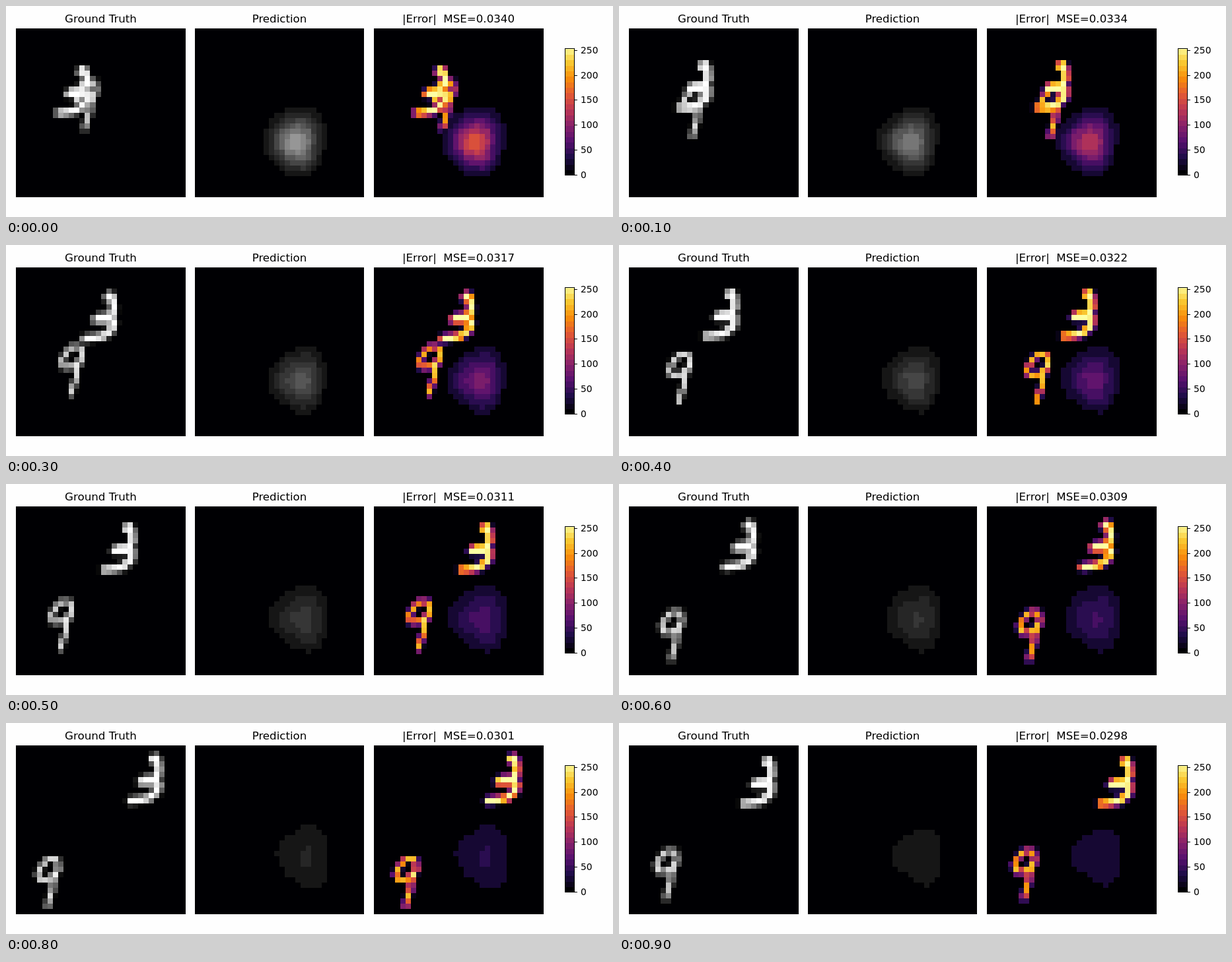
An HTML page with a canvas for the animation above (1 s loop, 919 by 320 pixels).

```html
<!DOCTYPE html>
<html lang="en">
<head>
<meta charset="utf-8">
<title>Prediction error</title>
<style>
  html, body { margin: 0; width: 100%; height: 100%; overflow: hidden; background: #fefefe; }
  canvas, svg { position: absolute; left: 0; top: 0; width: 919px; height: 320px; }
  text { font-family: "DejaVu Sans", sans-serif; font-size: 13.89px; fill: #000; white-space: pre; }
  .title { font-size: 16.67px; text-anchor: middle; }
</style>
</head>
<body>
<canvas id="stage" width="919" height="320"></canvas>
<svg viewBox="0 0 919 320">
  <text class="title" x="143.5" y="25">Ground Truth</text>
  <text class="title" x="414" y="25">Prediction</text>
  <text class="title" x="685" y="25" id="score"></text>
  <g id="ticks"></g>
</svg>
<script>
const ctx = document.getElementById('stage').getContext('2d');
const score = document.getElementById('score');
const N = 32, STEP = 100, COUNT = 10;
const PANELS = { truth: 15.2, guess: 285.8, error: 557 };
const mse = [340, 334, 320, 317, 322, 311, 309, 305, 301, 298];

// Strokes in grid cells; start, speed and wall in half cells.
const three = {
  r: 1.4,
  lines: [
    [18.7, 5.2, 19.2, 4.7, 19.7, 5.4, 19.9, 7.5, 19.3, 8.8, 17.2, 8.9, 16.5, 9.4, 18.8, 9.4],
    [19.3, 8.8, 19.9, 9.8, 19.6, 11.2, 18, 12.5, 16.5, 12.8, 14.6, 13]
  ],
  x: { start: -13.2, speed: 3.35, wall: 15.5 },
  y: { start: 5.9, speed: -1.5, wall: -5.75 }
};
const nine = {
  r: 0.85,
  lines: [
    [11.3, 16.6, 9.6, 16.5, 8.4, 17.8, 7.6, 19.3, 8, 20.4, 9.4, 20.4, 10.5, 19.7, 11.6, 18.6, 11.3, 16.6],
    [11.2, 19.2, 10.5, 20.8, 10.4, 22.5, 9.8, 24, 9.5, 25.5]
  ],
  x: { start: 7.2, speed: -1.75, wall: -6.75 },
  y: { start: -13, speed: 3.25, wall: 11.6 }
};

const heat = [[0, 0, 3], [31, 12, 72], [87, 16, 110], [136, 34, 106], [188, 55, 84],
  [227, 89, 51], [249, 142, 9], [249, 201, 50], [252, 255, 164]];

const clamp = (v, a, b) => Math.min(b, Math.max(a, v));
const gray = v => `rgb(${[v, v, Math.max(v, 3)].map(Math.round)})`;
const noise = (x, y) => {
  const s = Math.sin(x * 127.1 + y * 311.7) * 43758.5453;
  return (s - Math.floor(s)) * 2 - 1;
};

function inferno(v) {
  const p = clamp(v / 253, 0, 1) * 8, i = Math.min(7, Math.floor(p));
  return `rgb(${heat[i].map((a, k) => Math.round(a + (heat[i + 1][k] - a) * (p - i)))})`;
}

// Steady drift that reflects off one wall, snapped to half cells.
function bounce({ start, speed, wall }, n) {
  const p = start + speed * n;
  return Math.round((p - wall) * speed > 0 ? 2 * wall - p : p);
}

function distance(x, y, line) {
  let best = 99;
  for (let i = 0; i + 3 < line.length; i += 2) {
    const [ax, ay, bx, by] = line.slice(i, i + 4).map(v => v * 2);
    const dx = bx - ax, dy = by - ay;
    const u = clamp(((x - ax) * dx + (y - ay) * dy) / (dx * dx + dy * dy), 0, 1);
    best = Math.min(best, Math.hypot(x - ax - u * dx, y - ay - u * dy));
  }
  return best;
}

// Mean coverage of the four half cells in one grid cell.
function ink(digit, n, col, row) {
  const left = bounce(digit.x, n), top = bounce(digit.y, n);
  let sum = 0;
  for (let k = 0; k < 4; k++) {
    const x = col * 2 + 0.5 + k % 2 - left;
    const y = row * 2 + 0.5 + (k >> 1) - top;
    const d = Math.min(...digit.lines.map(l => distance(x, y, l)));
    sum += clamp(digit.r - d + 0.5, 0, 1);
  }
  return sum * 255 / 4;
}

// A lopsided glow that fades, widens and drifts right, in flat levels.
function predict(n, col, row) {
  const u = n / (COUNT - 1);
  const dx = col + 0.5 - (19.1 + 3 * u), dy = row + 0.5 - (22 - 0.5 * u);
  const sx = (2.75 + 1.6 * u * u) * (1 - Math.sign(dx) * 0.3 * u);
  const sy = (3.2 + 2.4 * u * u) * (dy < 0 ? 1.12 : 0.88);
  const wobble = 1 + 0.14 * Math.sin(3 * Math.atan2(dy, dx) + 1);
  const q = ((dx / sx) ** 2 + (dy / sy) ** 2) * wobble;
  const v = 155 * 0.82 ** n * Math.exp(-q / 2) * (1 + 0.08 * noise(col, row));
  return v < 16 ? 0 : 22 + 16 * Math.max(0, Math.round((v - 22) / 16));
}

function build(n) {
  const cells = [];
  for (let row = 0; row < N; row++) {
    for (let col = 0; col < N; col++) {
      const truth = Math.max(ink(three, n, col, row), ink(nine, n, col, row));
      const guess = predict(n, col, row);
      cells.push({ col, row, truth: gray(truth), guess: gray(guess), error: inferno(Math.abs(truth - guess)) });
    }
  }
  return cells;
}

function draw(n) {
  for (const name in PANELS) {
    const edge = c => Math.round(PANELS[name] + c * 8.02);
    for (const cell of steps[n]) {
      const x = edge(cell.col);
      ctx.fillStyle = cell[name];
      ctx.fillRect(x, 34 + cell.row * 8, edge(cell.col + 1) - x, 8);
    }
  }
  score.textContent = '|Error|\u00a0\u00a0MSE=0.0' + mse[n];
}

function colorbar() {
  for (let y = 65; y < 257; y++) {
    ctx.fillStyle = inferno(Math.floor((257 - y) / 192 * 253 / 11) * 11);
    ctx.fillRect(846, y, 15, 1);
  }
  ctx.strokeStyle = ctx.fillStyle = '#000';
  ctx.lineWidth = 1;
  ctx.strokeRect(846.5, 64.5, 14, 192);
  let labels = '';
  for (let k = 0; k <= 5; k++) {
    const y = Math.round(256.15 - k * 37.9);
    ctx.fillRect(861, y, 4, 1);
    labels += `<text x="870" y="${y + 5}">${k * 50}</text>`;
  }
  document.getElementById('ticks').innerHTML = labels;
}

const steps = Array.from({ length: COUNT }, (_, n) => build(n));
let shown = 0, start = null;
function tick(now) {
  if (start === null) start = now;
  const n = Math.floor((now - start) / STEP) % COUNT;
  if (n !== shown) draw(shown = n);
  requestAnimationFrame(tick);
}
colorbar();
draw(0);
requestAnimationFrame(tick);
</script>
</body>
</html>
```
